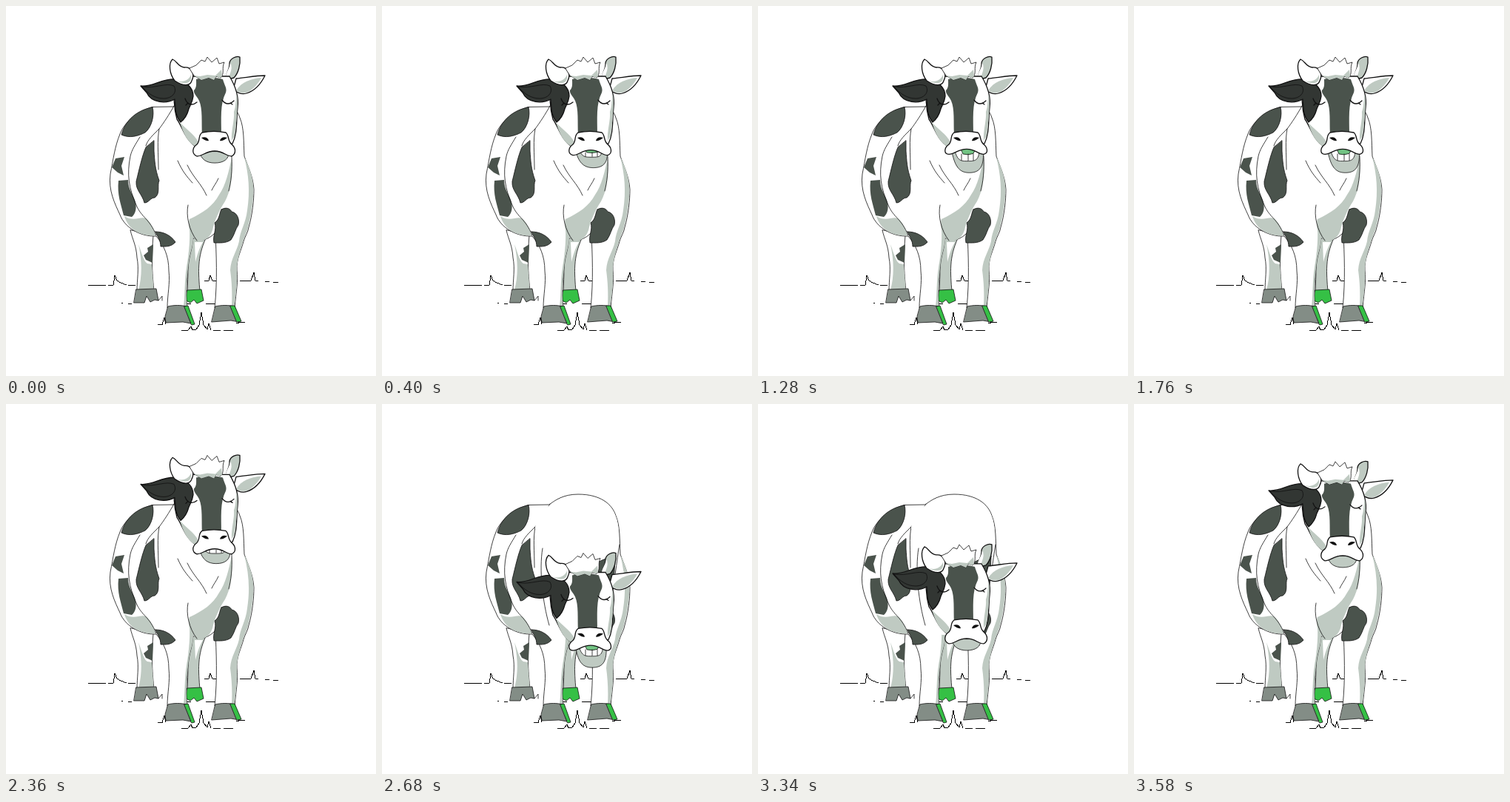
An HTML page that plays this animation: 500 by 500 pixels, repeating every 3.6 s.

```html
<!DOCTYPE html>
<html lang="en">
<head>
<meta charset="utf-8">
<title>Grazing cow</title>
<style>
  html, body { margin: 0; width: 100%; height: 100%; overflow: hidden; background: #fff; }
  svg { display: block; width: 500px; height: 500px; }
  path { fill: none; stroke-linejoin: round; stroke-linecap: round; }
  .line { stroke: #111; stroke-width: .8; }
  .bold { stroke: #111; stroke-width: 1.3; }
  .grass { stroke: #000; stroke-width: 1; shape-rendering: crispEdges; }
  .white { fill: #fff; }
  .shade { fill: #bfcac2; }
  .patch { fill: #4a534c; }
  .dark { fill: #323633; }
  .hoof { fill: #838d86; }
  .green { fill: #35c045; }
  .tongue { fill: #72c383; }
  .black { fill: #111; }
</style>
</head>
<body>
<svg viewBox="0 0 500 500">
  <!-- ground behind -->
  <path class="grass" d="M111 377.5H135M138 377.5H145L147 364L150 371L155 374L163 377M165 378L175 377M268 371H274L276 364L279 371L284 371M287 372H294M300 371L312 370M316 372L331 371L335 360L337 371L341 372M350 372H356M361 373H368M156 401.5H158M165 402H170M240 402H250M270 402H283"/>

  <!-- hind legs -->
  <path class="white line" d="M168 303C171 316 176 323 177 340C180 355 177 370 177 385H200C198 365 196 345 199 310Z"/>
  <path class="shade" d="M179 322C184 335 186 345 191 348L197 349C198 362 199 373 199.500 384H179C184 365 184 345 179 322Z"/>
  <path class="patch" d="M199 322L191 327L192 332L186 337L189 343L198 347Z"/>
  <path class="hoof line" d="M176 383L203 382L206 398L201 397L195 400L190 392L187 401H173Z"/>
  <path class="line" d="M206 398L211 392L211 398"/>
  <path class="shade line" d="M243 315C247 340 246 365 245 386H262C260 360 258 340 270 314Z"/>
  <path class="white" d="M255 319L266 319C260 330 258 338 256 346Z"/>
  <path class="green line" d="M245 384L264 383L267 398L258 402L254 397L249 401L243 398Z"/>

  <!-- body and front legs -->
  <path class="white line" d="M283 306C284 335 286 370 282 408H309C311 385 314 372 312 357C311 342 318 330 321 318C323 311 327 306 328 299C333 282 335 262 335 248C334 230 326 215 322 203C321 184 322 165 316 151C311 135 295 122 265 122C245 122 234 130 226 136L197 136.500C177 143 160 157 154 173C147 190 145 207 141 227C138 249 147 267 154 282C160 299 181 312 203 311C213 323 220 337 220 358C222 375 218 390 218 408H245C242 385 245 363 247 345C249 332 253 324 252 312C259 319 272 318 283 306Z"/>
  <path class="shade" d="M160 284C172 292 182 284 189 287C196 292 199 302 203 310C183 312 165 302 160 284ZM322 204C328 216 334 230 334.500 248C334 268 330 289 326 303C322 313 312 340 312 357C313 372 311 387 308.500 406H305C306 388 305 372 303 357C304 340 312 332 315 318C316 304 324 294 326 276C330 250 328 228 322 204Z"/>
  <path class="shade" d="M247 288C250 312 247 335 244 353C241 372 242 390 240 406H244.500C242 385 245 363 247 345C249 332 253 324 253 312Z"/>
  <path class="patch line" d="M198 137C201 147 197 164 188 171C178 176 167 179 156 174C161 154 178 140 198 137Z"/>
  <path class="patch" d="M148 206L160 204L156 216L159 229L151 225L143 218ZM152 236L165 235C165 250 174 257 175 266C177 275 174 282 170 285L159 283C155 267 150 255 152 236Z"/>
  <path class="line" d="M181 177C175 187 170 194 168 203C163 228 166 246 176 269C183 286 194 287 203 310"/>
  <path class="patch line" d="M200 182L200 196C201 209 201 219 207 236C204 242 209 254 201 259C195 259 193 266 187 266C184 254 175 249 176 237C180 221 184 202 189 191Z"/>
  <path class="patch line" d="M202 305C212 305 222 309 229 319C223 326 215 325 209 325C209 317 205 312 202 305Z"/>
  <path class="line" d="M227 135C221 146 213 158 207 166C199 174 191 181 189 189M207 166C204 182 206 198 206 221"/>
  <path class="patch line" d="M291 275C298 271 303 274 305 278C312 279 316 288 314 296C310 301 309 309 304 316C297 321 288 320 281 320C279 309 285 303 282 293C289 288 288 280 291 275Z"/>

  <g id="raised">
    <path class="shade" d="M305 205C307 231 303 251 296 264C288 276 282 290 279 303C275 315 266 319 257 317L251 311C247 303 246 296 248 288C267 279 279 271 288 255C297 242 301 224 305 205Z"/>
    <path class="line" d="M305 203C306 224 304 238 301 250M246 269C243 283 247 303 258 317M232 209C238 223 244 230 252 239M245 215C253 232 264 240 271 256M287 233C284 240 280 244 278 249"/>
  </g>
  <g id="lowered">
    <path class="white" d="M207 166C214 144 233 124 265 123C294 123 312 136 317 155C322 172 320 188 315 205L304 282V312H249L226 300C216 275 207 230 207 166Z"/>
    <path class="patch line" d="M315 206C304 208 294 211 285 219C283 227 288 233 284 240L273 247C277 252 275 259 279 264C290 264 293 276 308 278C313 253 314 230 315 206Z"/>
    <path class="line" d="M217 195C212 224 217 268 226 299M321 190C317 211 315 244 304 284"/>
  </g>

  <path class="hoof line" d="M219 406C226 404 237 404 244 406L250 429L239 427L216 428L215 420Z"/>
  <path class="green line" d="M241 406L246 405L255 430L251 431Z"/>
  <path class="hoof line" d="M283 406C290 404 302 404 309 406L315 427L304 425L278 427Z"/>
  <path class="green line" d="M303 405H309L318 426L312 427Z"/>

  <g id="head">
    <path class="white bold" d="M311 98C323 97 337 94 350 94C344 106 335 115 325 118C318 120 312 117 307 113Z"/>
    <path class="shade" d="M311 114C318 103 331 98 345 97C339 108 332 114 325 117C319 118 315 117 311 114Z"/>
    <path class="shade bold" d="M297 100C296 91 303 86 302 77C303 71 311 67 316 69C317 79 314 91 308 97Z"/>
    <path class="white" d="M297 98C296 90 302 86 303 77C307 83 303 91 300 99Z"/>
    <path class="white bold" d="M228 101C226 121 227 139 231 153C239 164 241 180 258 191L306 186C313 172 311 155 313 137C315 121 310 108 302 95L253 95Z"/>
    <path class="shade" d="M235 157C243 167 253 171 260 184L256 190C244 183 239 170 235 157ZM312 119C314 139 311 158 309 175L305 182C304 168 309 155 308 143C311 135 310 128 312 119Z"/>
    <path class="dark bold" d="M182 108C198 110 211 97 230 99C245 103 253 111 253 122C252 130 249 134 247 139C245 147 241 153 236 157C228 148 229 136 228 126C217 132 197 132 190 117Z"/>
    <path class="dark line" d="M184 109C202 112 216 103 227 108C232 117 224 125 213 125C202 125 192 119 184 109Z"/>
    <path class="white bold" d="M228 101C221 92 219 78 225 72C231 74 232 82 241 83C250 82 256 91 251 101C249 108 240 109 228 101Z"/>
    <path class="shade" d="M231 101C240 104 247 100 250 93C252 103 244 108 231 101Z"/>
    <path class="patch" d="M257 99C267 96 283 96 293 99C295 107 299 111 297 117C289 132 291 153 291 174H265C264 157 266 139 261 128C258 122 253 118 254 114C258 110 257 105 257 99Z"/>
    <path class="white line" d="M248 84L257 80L264 73L269 75L272 69L278 76L285 70L288 78L295 76C291 84 296 91 290 97L284 95L281 100L274 97L264 100L254 94Z"/>
    <path class="shade" d="M254 94L262 95L272 93L283 94L291 86L292 95L289 97L284 95L281 100L274 97L264 100Z"/>
    <path class="bold" d="M242 125C245 134 252 135 258 130M246 131L243 134M292 127C297 134 303 133 308 128M303 131L306 133"/>
    <path id="jaw" class="shade line"/>
    <path id="teeth" class="white line"/>
    <path id="tongue" class="tongue line"/>
    <path id="gaps" class="line"/>
    <path id="muzzle" class="white bold"/>
    <path class="black" d="M264 178C269 176 273 178 274 182C270 183 267 180 264 178ZM299 178C294 176 290 178 289 182C293 183 296 180 299 178Z"/>
  </g>

  <!-- front grass -->
  <path class="white" d="M257 438L261 431L264 414L267 431L272 438Z"/>
  <path class="grass" d="M205 430.500H211L214 421L216 430M237 438H246L250 433L252 438L257 437L261 431L264 414L267 431L272 437L274 429L277 438M280 438H290M294 438.500H307M311 429L318 427L323 427"/>
</svg>
<script>
const LOOP = 3600, CHEW = 480, DEPTH = 227;
const $ = id => document.getElementById(id);
const clamp = x => Math.max(0, Math.min(1, x));
const draw = (id, d) => $(id).setAttribute('d', d);
const show = (id, on) => { $(id).style.display = on ? '' : 'none'; };

// Head sinks, rests on the grass, then rises.
const headDrop = t => DEPTH * Math.min(clamp((t - 2360) / 550), clamp((LOOP - t) / 486));

function mouth(t) {
  const phase = t % CHEW / CHEW;
  const size = t < 2400 ? 20 : t < 2880 ? 14 : 0;
  const open = size * (1 - Math.abs(1 - 2 * phase));
  const slide = size ? -4 * Math.sin(2 * Math.PI * phase) : 0;
  const lift = open * .2;
  const chin = 212 + open, lip = 203 - lift, mid = 196 - lift;
  const bite = 199 + open * .8, left = 268 - open * .2, right = 295 + open * .3;

  draw('jaw', `M262 197C${263 + slide} ${chin - 5} ${271 + slide} ${chin} ${282 + slide} ${chin}
    C${294 + slide} ${chin} ${302 + slide} ${chin - 5} ${301 + slide} 197Z`);
  draw('muzzle', `M265 171C275 169 287 169 297 171C302 175 299 182 305 187C310 191 312 199 305 ${lip}
    C297 ${lip} 294 ${mid} 282 ${mid}C270 ${mid} 266 ${lip} 258 ${lip}
    C251 200 251 192 258 187C263 182 259 175 265 171Z`);
  for (const id of ['teeth', 'gaps']) show(id, open > 1);
  show('tongue', open > 5);
  draw('teeth', `M${left} ${mid}C${left + 4} ${bite} 274 ${bite} 283 ${bite}
    C293 ${bite} ${right} ${bite} ${right} ${mid}Z`);
  draw('tongue', `M274 ${mid}L277 ${mid + open * .5}Q284 ${mid + open * .65} 291 ${mid + open * .45}L294 ${mid}Z`);
  draw('gaps', [275, 284, 291].map(x => `M${x} ${mid + open * .5}V${bite - 1}`).join(''));
}

function frame(now) {
  const t = now % LOOP;
  const drop = headDrop(t);
  $('head').setAttribute('transform', `translate(0 ${drop})`);
  show('raised', drop < 45);
  show('lowered', drop >= 45);
  mouth(t);
  requestAnimationFrame(() => frame(performance.now() - start));
}
const start = performance.now();
frame(0);
</script>
</body>
</html>
```
